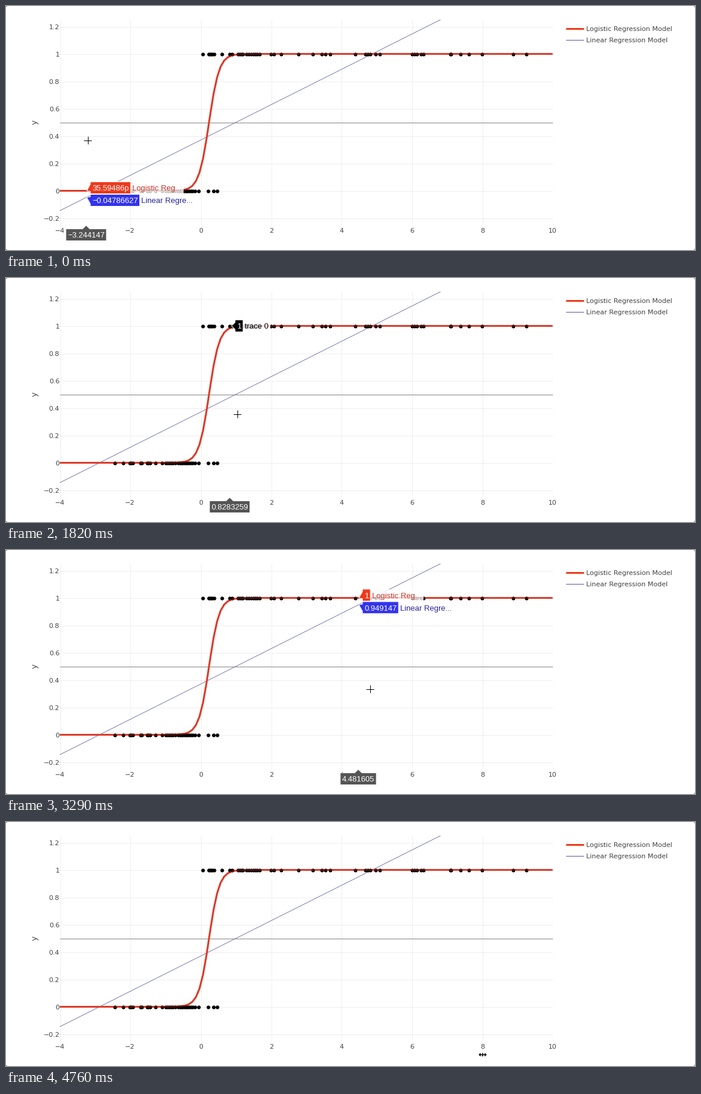
Recreate the animation shown at these times as a matplotlib script. Size 1152 by 410 pixels, loop 4830 ms.

```python
import math

import numpy as np
import matplotlib.pyplot as plt
from matplotlib.animation import FuncAnimation
from matplotlib.patches import Polygon, Rectangle

W, H, DPI = 1152, 410, 128  # a power of two keeps the pixel size exact
FRAMES, STEP = 69, 70
PT = 72 / DPI  # points per pixel

LEFT, RIGHT, TOP, BOTTOM = 90, 914, 23, 368
UNIT_X, UNIT_Y = (RIGHT - LEFT) / 14, 230
ZERO_X, ZERO_Y = LEFT + 4 * UNIT_X, 310.5

INK, GRID = "#444444", "#eeeeee"
RED, LABEL_RED, NAME_RED = "#dc3b29", "#ee3a1c", "#c8352a"
BLUE, LABEL_BLUE, NAME_BLUE = "#55559a", "#3333ee", "#23239a"
UI = dict(family="DejaVu Sans", size=11.1, cap=0.729)
TIP = dict(family="Liberation Sans", size=13, cap=0.716)


def px(x):
    return ZERO_X + np.asarray(x) * UNIT_X


def py(y):
    return ZERO_Y - np.asarray(y) * UNIT_Y


def linear(x):
    return 0.370793 + 0.12905064 * x


def logistic(x):
    return 1 / (1 + np.exp(1.6489 - 6.9078 * x))


# Observations, given by horizontal pixel position for each class
ZEROS = [182, 196, 207, 209.3, 212, 225, 227.3, 236, 238.2, 241.4, 250, 260.7,
         267.2, 270.3, 272.6, 276.4, 279, 283.3, 288.2, 291.1, 293.2, 295.4,
         298, 300.6, 303.3, 306.2, 309.4, 312.1, 316.3, 321.6, 337.6, 347.2, 353.3]
ONES = [328.5, 338.6, 341.1, 343.3, 345.2, 348.4, 361.4, 377.8, 387.7, 391.4,
        393.6, 396.2, 402.3, 406.4, 410.1, 413.5, 417.2, 420.3, 424.4, 443.4,
        447.6, 460.1, 513.4, 528.2, 533.7, 541.8, 583.8, 600.9, 604.6, 608.8,
        617.9, 625.2, 678.8, 683.2, 686.7, 693.9, 698.1, 743.2, 744.4, 760.4,
        774.2, 796.1, 847.6, 870.2]
ones = np.append((np.array(ONES) - ZERO_X) / UNIT_X, [0.8283259, 2.774829])
zeros = (np.array(ZEROS) - ZERO_X) / UNIT_X
dot_x = np.concatenate([zeros, ones])
dot_y = np.concatenate([np.zeros(len(zeros)), np.ones(len(ones))])
line_x = np.linspace(-20, 10, 300)

# Pointer path, and the slightly delayed hover position
MOVE_T = [0, 560, 770, 1820, 2660, 3290, 3780, 4480, 4550, 4620, 4690, 4760]
MOVE_X = [136, 181, 202, 386, 512, 608, 678, 788, 793, 796, 797, 797]
MOVE_Y = [225, 226, 226, 228, 231, 233, 235, 238, 246, 285, 345, 391]
HOVER_T = [0, 560, 770, 1820, 2660, 3290, 3780, 4480, 4690]
HOVER_X = [134.5, 178, 199.5, 374.2, 488.7, 592.1, 674.8, 785, 795]

fig = plt.figure(figsize=(W / DPI, H / DPI), dpi=DPI, facecolor="white")
ax = fig.add_axes([0, 0, 1, 1])
ax.set_xlim(0, W)
ax.set_ylim(H, 0)
ax.axis("off")


def write(x, y, s, font, color, ha="left", z=5):
    """Text whose capitals are centred on y."""
    size = font["size"]
    return ax.text(x, y + size * font["cap"] / 2, s, family=font["family"],
                   fontsize=size * PT, color=color, ha=ha, va="baseline", zorder=z)


def stroke(xs, ys, color, width, z=2, **kw):
    kw.setdefault("solid_capstyle", "butt")
    return ax.plot(xs, ys, color=color, lw=width * PT, zorder=z, **kw)[0]


def minus(s):
    return s.replace("-", "\u2212")


def draw_chart():
    for v in range(-4, 11, 2):
        x = float(px(v))
        if LEFT < x < RIGHT:
            x = math.floor(x) + 0.5
            stroke([x, x], [TOP, BOTTOM], GRID, 1, 1)
        write(x, 377, minus(str(v)), UI, INK, "center")
    for i in range(-1, 7):
        y = py(i / 5)
        stroke([LEFT, RIGHT], [y, y], GRID, 1, 1)
        write(89.5, y, minus(f"{i / 5:g}"), UI, INK, "right")
    ax.text(48.5, 195.5, "y", family="DejaVu Sans", fontsize=13 * PT, color=INK,
            rotation=90, ha="center", va="center")

    stroke([LEFT, RIGHT], [195.5, 195.5], "#858585", 1)
    ends = np.array([-4, (1.25 - linear(0)) / 0.12905064])
    stroke(px(ends), py(linear(ends)), BLUE, 0.75)

    xs = line_x[line_x > -4]
    xs = np.append(-4, xs)
    curve = px(xs), py(logistic(xs))
    stroke(*curve, RED, 3)
    ax.scatter(px(dot_x), py(dot_y), s=(6.2 * PT) ** 2, color="black", lw=0, zorder=3)
    stroke(*curve, RED, 3, 4, alpha=0.35)

    stroke([936, 966], [37.5, 37.5], LABEL_RED, 3)
    stroke([936, 966], [56.5, 56.5], BLUE, 1)
    write(970.5, 38, "Logistic Regression Model", UI, INK)
    write(970.5, 57, "Linear Regression Model", UI, INK)

    for x, sx in ((0, 1), (W, -1)):
        for y, sy in ((0, 1), (H, -1)):
            ax.add_patch(Polygon([(x, y), (x + 2 * sx, y), (x, y + 2 * sy)],
                                 fc="#777777", lw=0))


def number(v):
    """Hover format: about seven digits, SI prefix for tiny values."""
    mag = math.floor(math.log10(abs(v) or 1) + 0.01)
    power = 3 * round((mag - 1) / 3) if abs(mag) > 3 else 0
    digits = max(6 - mag + power, 0)
    s = f"{v / 10.0 ** power:.{digits}f}"
    if "." in s:
        s = s.rstrip("0").rstrip(".")
    unit = {0: "", -6: "\u03bc", -9: "n", -12: "p", -15: "f"}[power]
    return minus(s) + unit


live = []


def keep(artist):
    live.append(artist)
    return artist


def width(text):
    return text.get_window_extent().width


def shape(points, color, edge="white", z=10):
    keep(ax.add_patch(Polygon(points, fc=color, ec=edge, lw=PT, zorder=z)))


def axis_tip(x):
    cx = round(float(px(x)))
    text = keep(write(cx, 384.7, number(x), TIP, "white", "center", 12))
    half = width(text) / 2 + 3
    shape([(cx, 368.5), (cx + 6, 374.5), (cx + half, 374.5), (cx + half, 394.5),
           (cx - half, 394.5), (cx - half, 374.5), (cx - 6, 374.5)], "#555555")


def trace_tip(x, y, label_y, value, name, fill, ink):
    left, half = x + 6, 10
    text = keep(write(left + 3, label_y, number(value), TIP, "white", z=12))
    right = left + width(text) + 6
    title = keep(write(right + 3, label_y, name, TIP, ink, z=12))
    keep(ax.add_patch(Rectangle((right, label_y - half), width(title) + 6, 2 * half,
                                fc="white", alpha=0.8, lw=0, zorder=9)))
    shape([(x, y), (left, label_y + 6), (left, label_y + half),
           (right, label_y + half), (right, label_y - half),
           (left, label_y - half), (left, label_y - 6)], fill)


def hover(pos):
    near_dot = np.argmin(abs(px(dot_x) - pos))
    near_line = np.argmin(abs(px(line_x) - pos))
    dx, lx = dot_x[near_dot], line_x[near_line]
    if abs(px(dx) - pos) < abs(px(lx) - pos):
        v = dot_y[near_dot]
        trace_tip(round(float(px(dx))) + 3, py(v), py(v), v, "trace 0", "black", "black")
        axis_tip(dx)
        return

    values = logistic(lx), linear(lx)
    ys = [float(np.clip(py(v), TOP, BOTTOM)) for v in values]
    spots = list(ys)
    gap = ys[1] - ys[0]
    if abs(gap) < 21:  # push overlapping labels apart
        mid, push = sum(ys) / 2, math.copysign(10.5, gap)
        spots = [mid - push, mid + push]
    x = round(float(px(lx))) + 1
    trace_tip(x, ys[0], spots[0], values[0], "Logistic Reg...", LABEL_RED, NAME_RED)
    trace_tip(x, ys[1], spots[1], values[1], "Linear Regre...", LABEL_BLUE, NAME_BLUE)
    axis_tip(lx)


def cross(x, y):
    x, y = math.floor(x) + 0.5, math.floor(y) + 0.5
    for color, w, r, z in (("white", 3, 7, 20), ("black", 1, 6.5, 21)):
        keep(stroke([x - r, x + r], [y, y], color, w, z))
        keep(stroke([x, x], [y - r, y + r], color, w, z))


def resize_arrow(x, y):
    side = [(-7.5, 0), (-3, -4.5), (-3, -1.2), (3, -1.2), (3, -4.5)]
    points = side + [(-a, -b) for a, b in side]
    shape([(x + a, y + b) for a, b in points], "black", z=20)
    keep(stroke([x, x], [y - 3, y + 3], "black", 1.5, 21))


def draw(i):
    while live:
        live.pop().remove()
    t = i * STEP
    x, y = np.interp(t, MOVE_T, MOVE_X), np.interp(t, MOVE_T, MOVE_Y)
    if y < BOTTOM:
        hover(np.interp(t, HOVER_T, HOVER_X))
        cross(x, y)
    else:
        resize_arrow(x, y)
    return live


draw_chart()
anim = FuncAnimation(fig, draw, frames=FRAMES, interval=STEP, repeat=True, repeat_delay=0)
plt.show()
```
